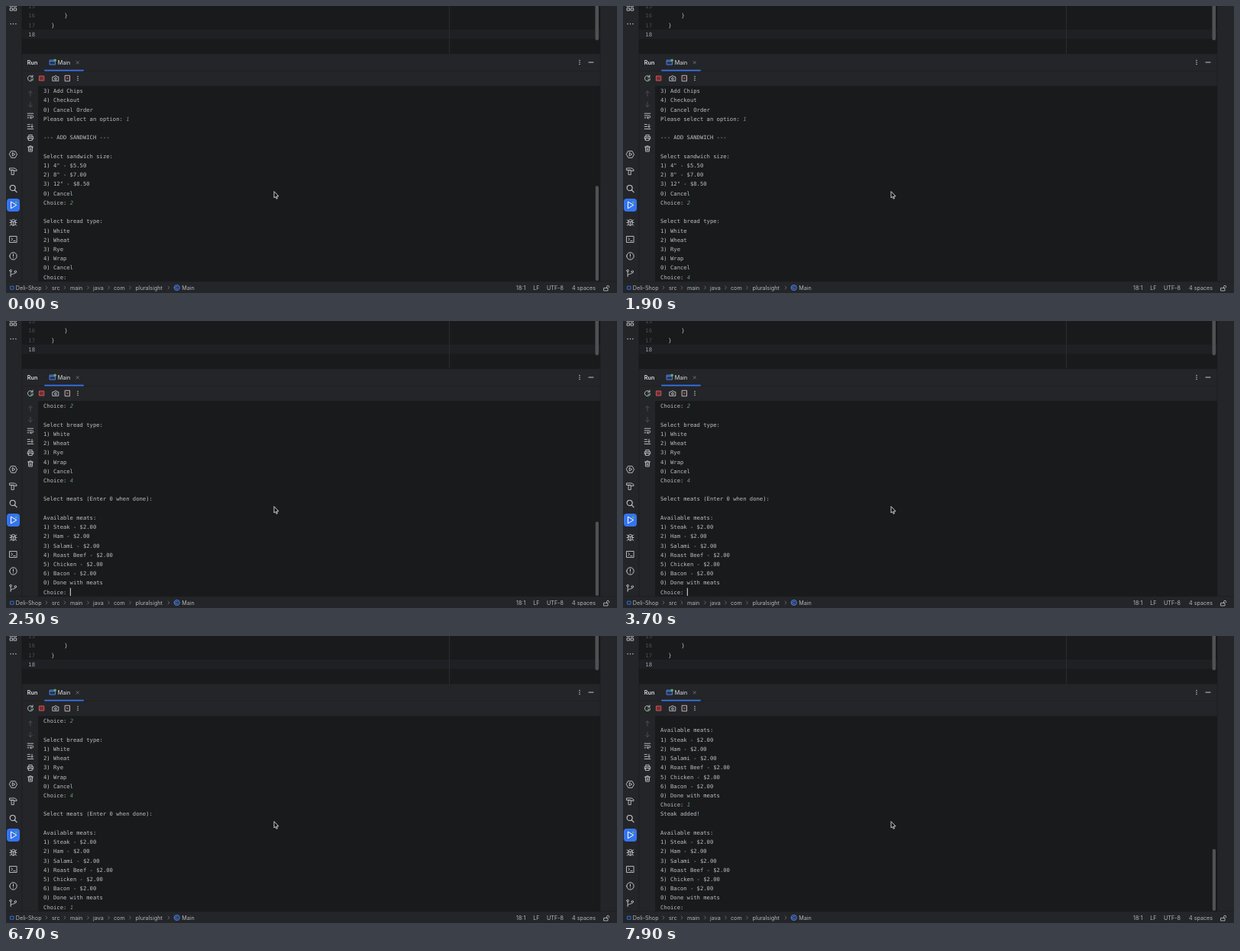
Recreate the animation shown at these times as an HTML page with a canvas. Size 800 by 377 pixels, loop 8000 ms.

```html
<!DOCTYPE html>
<html lang="en">
<head>
<meta charset="utf-8">
<title>Deli-Shop console</title>
<style>
  html, body { margin: 0; width: 100%; height: 100%; overflow: hidden; background: #191a1c; }
  canvas { display: block; width: 800px; height: 377px; }
</style>
</head>
<body>
<canvas id="stage" width="800" height="377"></canvas>
<script>
const ctx = document.getElementById('stage').getContext('2d');

const LOOP = 8000;
const MONO = '7.2px "DejaVu Sans Mono", monospace';
const UI = '7.2px Inter, sans-serif';
const C = {
  editor: '#191a1c', panel: '#242528', line: '#1f2023', border: '#1c1d1f',
  text: '#bcbec4', icon: '#c6c8ce', dim: '#4b4e55', input: '#629d6b',
  blue: '#3574f0', red: '#db5c5c', green: '#57965c', thumb: '#505153'
};

// Console geometry
const TOP = 105, VIEW = 256, LINE = 12.225, LEFT = 49, CHAR = 4.334;
const HIDDEN_LINES = 22;

const meatMenu = ['', 'Available meats:',
  ...['Steak', 'Ham', 'Salami', 'Roast Beef', 'Chicken', 'Bacon']
    .map((name, i) => `${i + 1}) ${name} - $2.00`),
  '0) Done with meats', 'Choice: '];

const orderMenu = ['3) Add Chips', '4) Checkout', '0) Cancel Order',
  'Please select an option: |1', '', '--- ADD SANDWICH ---', '',
  'Select sandwich size:', '1) 4" - $5.50', '2) 8" - $7.00', '3) 12" - $8.50',
  '0) Cancel', 'Choice: |2', '',
  'Select bread type:', '1) White', '2) Wheat', '3) Rye', '4) Wrap',
  '0) Cancel', 'Choice: '];

// Each answer is typed, entered, then followed by new output.
const answers = [
  { key: '4', typed: 1200, enter: 2000, output: ['', 'Select meats (Enter 0 when done):', ...meatMenu] },
  { key: '1', typed: 5200, enter: 6750, output: ['Steak added!', ...meatMenu] }
];
const SCROLL_TIME = 330;
const caretResets = [-700, 1200, 2300, 5200, 7000];
const BLINK = 500;

const clamp = v => Math.max(0, Math.min(1, v));
const smooth = v => v * v * (3 - 2 * v);

function rect(x, y, w, h, color, radius = 0) {
  ctx.fillStyle = color;
  ctx.beginPath();
  ctx.roundRect(x, y, w, h, radius);
  ctx.fill();
}

function text(str, x, y, color = C.text, font = UI) {
  ctx.font = font;
  ctx.fillStyle = color;
  ctx.fillText(str, x, y);
}

function icon(x, y, path, color = C.icon, width = 0.9, fill = null) {
  const shape = new Path2D(path);
  ctx.save();
  ctx.translate(x, y);
  ctx.lineWidth = width;
  ctx.lineCap = ctx.lineJoin = 'round';
  if (fill) { ctx.fillStyle = fill; ctx.fill(shape); }
  ctx.strokeStyle = color;
  ctx.stroke(shape);
  ctx.restore();
}

function dot(x, y, r, color) {
  ctx.fillStyle = color;
  ctx.beginPath();
  ctx.arc(x, y, r, 0, Math.PI * 2);
  ctx.fill();
}

const dots = (x, y, dx, dy) => [-1, 0, 1].forEach(i => dot(x + i * dx, y + i * dy, 0.75, C.icon));
const ring = r => `M${-r} 0a${r} ${r} 0 1 0 ${2 * r} 0a${r} ${r} 0 1 0 ${-2 * r} 0`;

function drawEditor() {
  rect(21, 0, 757, 63, C.editor);
  rect(21, 31, 757, 12, C.line);
  rect(580, 0, 1, 63, '#2b2c2f');
  [15, 16, 17, 18].forEach((n, i) =>
    text(n, 29.3, 3.2 + i * 12.2, n === 18 ? '#a1a3ab' : C.dim, MONO));
  text('}', 76.6, 15.4, C.text, MONO);
  text('}', 59.3, 27.6, C.text, MONO);
  rect(771.5, -3, 4.5, 48, C.thumb, 2);
}

function drawSidebar() {
  icon(9.5, 3, 'M-4 -5h3v3h-3zM1 -5h3v3h-3zM-4 0h3.2v3h-3.2zM1 0h3.2v3h-3.2z');
  dots(9.5, 23.5, 3.4, 0);
  icon(9.5, 195, 'M-2.6 -4.3h5.2l2.4 4.3l-2.4 4.3h-5.2l-2.4 -4.3zM-1.2 -2v4l3.2 -2z');
  icon(9.5, 217, 'M-4.5 -4h6l3 2v1.6h-3l-1 -1h-5zM-2 -1.4h2.8v6h-2.8z');
  icon(9.5, 240, 'M-4.3 -1a3.5 3.5 0 1 0 7 0a3.5 3.5 0 1 0 -7 0M1.8 1.7l2.8 2.9', C.icon, 1.1);
  rect(1, 253, 17, 17, C.blue, 4);
  icon(9.5, 261.7, 'M-3 -4.2v8.4l7 -4.2z', '#fff', 1);
  dot(13.2, 258, 1.4, '#5fad65');
  icon(9.5, 284.5, 'M-2.5 -1.6a2.5 2.5 0 0 1 5 0v3a2.5 2.5 0 0 1 -5 0zM-2.5 0h-2M2.5 0h2M-2.3 -2l-2 -1.5M2.3 -2l2 -1.5M-2.3 2.2l-2 1.5M2.3 2.2l2 1.5M-2.5 -1.3h5M0 -1v4.5');
  icon(9.5, 306.5, 'M-4.6 -4h9.2v8h-9.2zM-2.6 -1.8l1.8 1.6l-1.8 1.6M0.3 2h2.3');
  icon(9.5, 328.5, ring(4.7) + 'M0 -2.5v2.8M0 2.3v0.1', C.icon, 1);
  icon(9.5, 351, 'M-3.3 -2v6.3M-4.6 -3.3a1.3 1.3 0 1 0 2.6 0a1.3 1.3 0 1 0 -2.6 0M1.6 -2a1.3 1.3 0 1 0 2.6 0a1.3 1.3 0 1 0 -2.6 0M2.9 -0.6c0 2.4 -6.2 0.6 -6.2 3.5');
}

function drawRunHeader() {
  text('Run', 27.8, 76.9, '#dfe1e5', '600 ' + UI);
  icon(61, 74, 'M-3.5 -3h7v6h-7zM-3.5 -1.3h7', '#548af7', 0.9, '#25324d');
  dot(64.2, 71.2, 1.7, '#5fad65');
  text('Main', 67.8, 76.9, '#dfe1e5');
  icon(93.7, 74.3, 'M-1.7 -1.7l3.4 3.4M1.7 -1.7l-3.4 3.4', '#85878d', 0.7);
  rect(21, 85, 757, 0.6, C.border);
  rect(50, 83.7, 52, 1.7, C.blue, 0.8);
  dots(751, 74, 0, 2.6);
  icon(766, 74, 'M-3 0h6', C.icon, 1);

  icon(32, 95, 'M2.8 -2a3.5 3.5 0 1 0 0.7 2.2M3 -4v2.3h-2.3');
  icon(34, 97.3, 'M-1.2 -1.6v3.2l2.6 -1.6z', C.green, 0.8, C.green);
  icon(46.8, 95, 'M-3 -3h6v6h-6z', C.red, 0.9, '#722f32');
  icon(65, 95.3, 'M-3.8 -2.2h1.8l0.8 -1.2h2.4l0.8 1.2h1.8v5.2h-7.6zM-1.4 0.3a1.4 1.4 0 1 0 2.8 0a1.4 1.4 0 1 0 -2.8 0');
  icon(80.5, 95, 'M-3 -3.7h6v7.4h-6z');
  icon(80.5, 95, 'M-1.2 -1.2l2.4 2.4M1.2 -1.2l-2.4 2.4', C.red, 1);
  dots(94, 95, 0, 2.6);
}

function drawConsoleTools() {
  icon(32, 115, 'M0 3.2v-6.4M-2.4 -0.8l2.4 -2.4l2.4 2.4', '#505257');
  icon(32, 129.5, 'M0 -3.2v6.4M-2.4 0.8l2.4 2.4l2.4 -2.4', '#505257');
  icon(32, 144, 'M-3.8 -2.8h7.6M-3.8 0h6.2a1.4 1.4 0 0 1 0 2.8h-2.6M1 1.6l-1.3 1.2l1.3 1.2M-3.8 2.8h1.8');
  icon(32, 158.5, 'M-3.8 -2.8h3.2M-3.8 0h3.2M-3.8 3h7.6M2 -3.2v4.2M0.5 -0.5l1.5 1.5l1.5 -1.5');
  icon(32, 173, 'M-2.2 -1.3v-2.3h4.4v2.3M-2.2 1.8h-1.5v-3.1h7.4v3.1h-1.5M-2.2 0.6h4.4v3h-4.4z');
  icon(32, 187.5, 'M-3.5 -2.4h7M-1.2 -2.4v-1.2h2.4v1.2M-2.6 -2.4l0.3 6h4.6l0.3 -6M-0.8 -0.5v2.5M0.8 -0.5v2.5');
}

function drawStatusBar() {
  rect(0, 362, 800, 15, C.panel);
  rect(0, 361.6, 800, 0.6, C.border);
  icon(8, 370.2, 'M-2 -2h4v4h-4z', C.blue, 0.9);
  const crumbs = [['Deli-Shop', 12.8], ['src', 60], ['main', 84], ['java', 114],
    ['com', 141], ['pluralsight', 169.5], ['Main', 230.3]];
  crumbs.forEach(([name, x]) => text(name, x, 372.7, '#b4b6bc'));
  [53, 77, 107.5, 134.5, 162.5, 213].forEach(x =>
    icon(x, 370, 'M-0.9 -2l1.9 2l-1.9 2', '#7b7d83', 0.7));
  icon(223.7, 370, ring(3.6), '#548af7', 0.9, '#25324d');
  icon(223.7, 370, 'M1.3 -1.1a1.7 1.7 0 1 0 0 2.2', '#548af7', 0.8);
  [['18:1', 668], ['LF', 690.3], ['UTF-8', 708], ['4 spaces', 741]]
    .forEach(([label, x]) => text(label, x, 372.7, '#b4b6bc'));
  icon(786, 371, 'M-3 -0.6h5v3.6h-5zM0.6 -0.6v-1.6a1.5 1.5 0 0 1 3 0v0.8', C.icon, 0.8);
}

function consoleState(t) {
  const lines = [...orderMenu];
  let bottom = lines.length;
  for (const { key, typed, enter, output } of answers) {
    if (t >= typed) lines[lines.length - 1] += '|' + key;
    if (t >= enter) {
      lines.push(...output);
      bottom += output.length * smooth(clamp((t - enter) / SCROLL_TIME));
    }
  }
  return { lines, bottom };
}

function scrollbarAlpha(t) {
  if (t < 2000) return 1 - clamp((t - 250) / 450);
  if (t < 6750) return 1 - clamp((t - 3050) / 450);
  return 1;
}

function drawConsole(t) {
  const { lines, bottom } = consoleState(t);
  const lineY = i => 358.7 + (i + 1 - bottom) * LINE;

  ctx.save();
  ctx.beginPath();
  ctx.rect(42, TOP, 736, 256.6);
  ctx.clip();
  lines.forEach((line, i) => {
    const y = lineY(i);
    if (y < TOP - 3 || y > TOP + VIEW + 8) return;
    const [output, input] = line.split('|');
    text(output, LEFT, y, C.text, MONO);
    if (input) text(input, LEFT + output.length * CHAR, y, C.input, 'italic ' + MONO);
  });

  const reset = caretResets.filter(r => r <= t).pop();
  if (Math.floor((t - reset) / BLINK) % 2 === 0) {
    const column = lines[lines.length - 1].replace('|', '').length;
    rect(Math.round(LEFT + column * CHAR) - 0.2, lineY(lines.length - 1) - 8, 1.1, 10.4, '#ced0d6');
  }
  ctx.restore();

  const total = (HIDDEN_LINES + lines.length) * LINE;
  const scrolled = (HIDDEN_LINES + bottom) * LINE - VIEW;
  ctx.globalAlpha = scrollbarAlpha(t);
  rect(771.8, TOP + scrolled / total * VIEW, 4.2, VIEW * VIEW / total, C.thumb, 2);
  ctx.globalAlpha = 1;
}

function draw() {
  const t = performance.now() % LOOP;
  rect(0, 0, 800, 377, C.panel);
  rect(42, TOP, 736, 257, C.editor);
  drawEditor();
  rect(20.5, 0, 0.7, 362, C.border);
  rect(777.7, 0, 0.7, 362, C.border);
  rect(21, 62.6, 757, 0.6, C.border);
  drawSidebar();
  drawRunHeader();
  drawConsoleTools();
  drawConsole(t);
  drawStatusBar();
  icon(351, 244, 'M0 0v8l1.8 -1.6l1.3 2.9l1.4 -0.6l-1.3 -2.8h2.4z', '#e4e4e4', 0.9, '#0a0a0a');
  requestAnimationFrame(draw);
}
draw();
</script>
</body>
</html>
```
